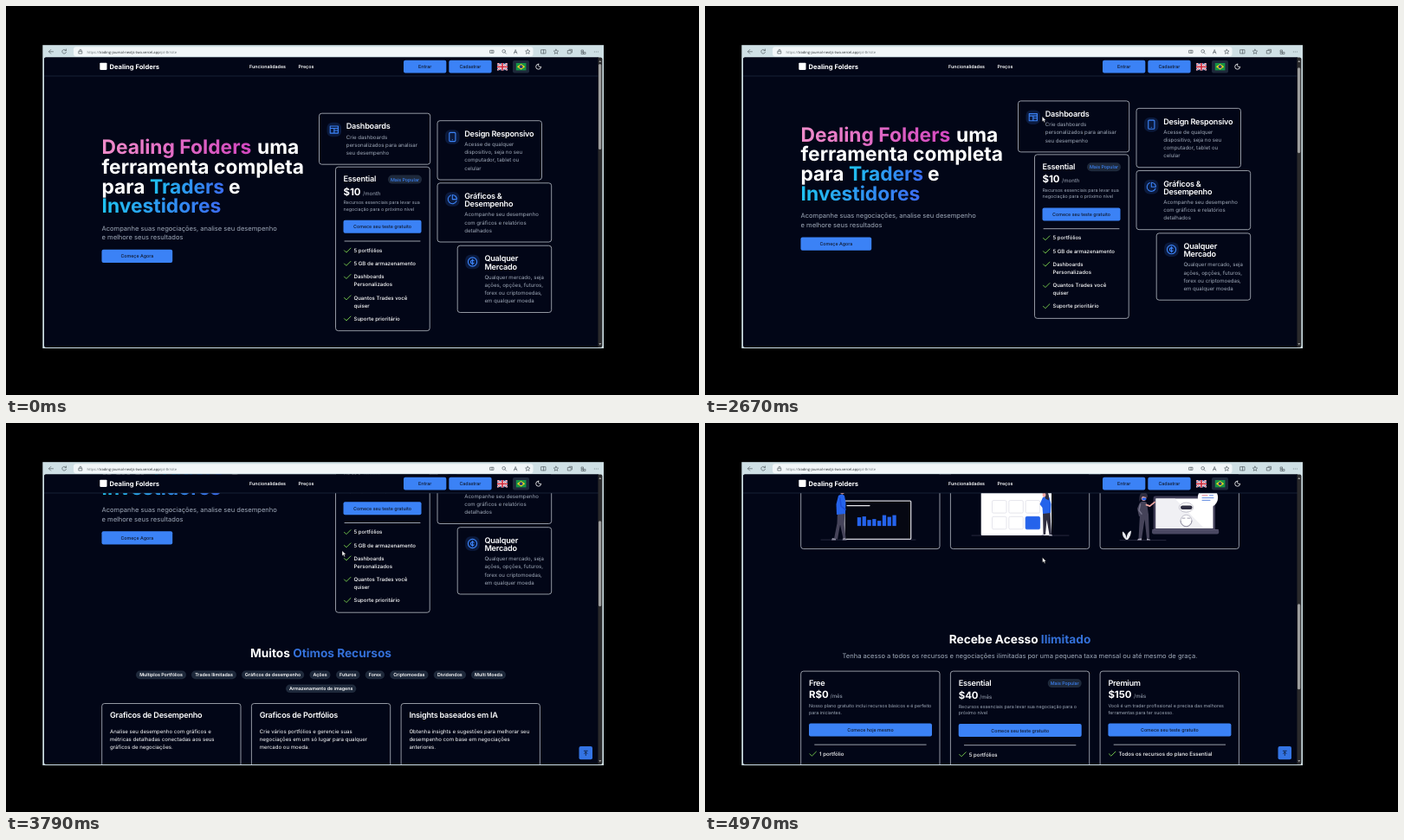
Animation, 800 px wide and 450 px high, one loop 5 s. Source, as an HTML page:

```html
<!DOCTYPE html>
<html lang="pt-BR">
<head>
<meta charset="utf-8">
<title>Dealing Folders</title>
<style>
html, body { margin: 0; width: 100%; height: 100%; overflow: hidden; background: #000; }
svg { display: block; }
text { font-family: Inter, sans-serif; fill: #fff; white-space: pre; text-rendering: geometricPrecision; }
.hero { font-size: 22.8px; font-weight: 700; }
.heading { font-size: 13.68px; font-weight: 700; }
.heading tspan { fill: #3470d8; }
.title { font-size: 9.12px; font-weight: 600; letter-spacing: -.025em; }
.price { font-size: 11.4px; font-weight: 700; }
.brand { font-size: 7.6px; font-weight: 700; }
.lead { font-size: 7.55px; fill: #a0aab9; }
.body { font-size: 6.08px; }
.muted { font-size: 6.08px; fill: #a0aab9; }
.note { font-size: 5.32px; fill: #a0aab9; }
.item { font-size: 6.08px; font-weight: 500; }
.nav { font-size: 5.32px; font-weight: 600; }
.label { font-size: 5.32px; font-weight: 500; fill: #0f172a; }
.badge { font-size: 5.32px; font-weight: 500; fill: #3b82f6; }
.url { font-family: "Open Sans", sans-serif; font-size: 4.1px; fill: #6b7478; }
.url tspan { fill: #22282b; }
.mid { text-anchor: middle; }
.card { fill: #020617; stroke: #c3c8d0; stroke-width: .75; }
.line { fill: none; stroke-linecap: round; stroke-linejoin: round; }
</style>
</head>
<body>
<svg id="stage" width="800" height="450" viewBox="0 0 800 450"></svg>
<script>
const stage = document.getElementById('stage');
const BLUE = '#3b82f6', PAGE = '#020617', HAIR = '#2f2e41', CLOTH = '#454359', SKIN = '#f3a9a4', SLATE = '#1e293b', RULE = '#c3c8d0';

const text = (cls, x, y, str, extra = '') => `<text class="${cls}" x="${x}" y="${y}" ${extra}>${str}</text>`;
const lines = (cls, x, y, step, list) => list.map((s, i) => text(cls, x, y + i * step, s)).join('');
const rect = (x, y, w, h, fill, r = 0, extra = '') =>
  `<rect x="${x}" y="${y}" width="${w}" height="${h}" rx="${r}" fill="${fill}" ${extra}/>`;
const card = (x, y, w, h) => `<rect class="card" x="${x}" y="${y}" width="${w}" height="${h}" rx="3"/>`;
const line = (d, color, width = .8, extra = '') =>
  `<path class="line" d="${d}" stroke="${color}" stroke-width="${width}" ${extra}/>`;
const shape = (d, fill) => `<path d="${d}" fill="${fill}"/>`;
const oval = (x, y, rx, ry, fill, extra = '') => `<ellipse cx="${x}" cy="${y}" rx="${rx}" ry="${ry}" fill="${fill}" ${extra}/>`;
const button = (x, y, w, h, label) =>
  rect(x, y, w, h, BLUE, 2) + text('label mid', x + w / 2, y + h / 2 + 1.9, label);
const popular = (x, y) => rect(x, y, 39, 10, SLATE, 5) + text('badge mid', x + 19.5, y + 6.9, 'Mais Popular');
const check = (x, y) => line(`M${x} ${y}l2.4 2.4 5-5`, '#6fbf4a', 1);

const icons = {
  panels: 'M3 4h18v16H3zM3 9h18M12 9v11M12 14h9',
  phone: 'M7 2h10a2 2 0 0 1 2 2v16a2 2 0 0 1-2 2H7a2 2 0 0 1-2-2V4a2 2 0 0 1 2-2zM12 18h.01',
  pie: 'M21.2 15.9A10 10 0 1 1 8 2.8M22 12A10 10 0 0 0 12 2v10z',
  coin: 'M22 12a10 10 0 1 1-20 0a10 10 0 1 1 20 0M15 9.4a4 4 0 1 0 0 5.2M12 6v12'
};

function feature(x, y, w, h, icon, titles, body) {
  const end = y + 18.6 + (titles.length - 1) * 9.12;
  return card(x, y, w, h) + rect(x + 9, y + 10.5, 16.5, 16.5, '#0b1a3d', 6) +
    line(icons[icon], BLUE, 2.2, `transform="translate(${x + 11.2} ${y + 12.7}) scale(.51)"`) +
    lines('title', x + 31.2, y + 18.2, 9.12, titles) +
    lines('muted', x + 31.2, end + 10.9, 9.12, body);
}

function hero() {
  const items = [[284.8, '5 portfólios'], [300, '5 GB de armazenamento'], [315.1, 'Dashboards', 'Personalizados'],
    [339.5, 'Quantos Trades você', 'quiser'], [363.7, 'Suporte prioritário']];
  return text('hero', 110.5, 171, 'Dealing Folders', 'style="fill:url(#pink)"') + text('hero', 290, 171, 'uma') +
    text('hero', 110.5, 193.8, 'ferramenta completa') + text('hero', 110.5, 216.6, 'para') +
    text('hero', 166, 216.6, 'Traders', 'style="fill:url(#cyan)"') + text('hero', 257, 216.6, 'e') +
    text('hero', 110.5, 239.4, 'Investidores', 'style="fill:url(#cyan)"') +
    lines('lead', 110.5, 259.6, 10.64, ['Acompanhe suas negociações, analise seu desempenho', 'e melhore seus resultados']) +
    button(110.5, 281.8, 81.7, 15.2, 'Começe Agora') +
    feature(361.5, 124.2, 128.2, 59, 'panels', ['Dashboards'], ['Crie dashboards', 'personalizados para analisar', 'seu desempenho']) +
    feature(498, 132.7, 120.5, 68.3, 'phone', ['Design Responsivo'],
      ['Acesse de qualquer', 'dispositivo, seja no seu', 'computador, tablet ou', 'celular']) +
    feature(498, 204.8, 131.7, 68.2, 'pie', ['Gráficos &amp;', 'Desempenho'],
      ['Acompanhe seu desempenho', 'com gráficos e relatórios', 'detalhados']) +
    feature(521.2, 277.2, 108.5, 77.3, 'coin', ['Qualquer', 'Mercado'],
      ['Qualquer mercado, seja', 'ações, opções, futuros,', 'forex ou criptomoedas,', 'em qualquer moeda']) +
    card(380.5, 186.2, 108.7, 189.5) + text('title', 389.5, 203.4, 'Essential') + popular(441, 195.6) +
    text('price', 389.5, 218.6, '$10') + text('muted', 412, 218.6, '/month') +
    lines('note', 389.5, 229, 7.6, ['Recursos essenciais para levar sua', 'negociação para o próximo nível']) +
    button(389.5, 247.8, 90, 15, 'Comece seu teste gratuito') + line('M391 272H478', RULE) +
    items.map(([y, ...list]) => check(390.5, y - 2) + lines('item', 401.5, y, 9.12, list)).join('');
}

function chartArt() {
  const bars = [10, 11, 7, 8, 6, 12.5, 10.5, 12.5];
  return line('M134 306H243', '#3f3d56', .6) + rect(161, 261, 76.7, 44.3, '#060812', 1, 'stroke="#cfcfd6" stroke-width="1.3"') +
    line('M164 266.5H190', '#e6e6ea', 1.2) +
    bars.map((h, i) => rect(175.8 + i * 5.8, 290 - h, 4.3, h, '#2563eb')).join('') +
    shape('M153 274h8.5l-1 14 2 16-3 .5-3.5-16-3 17-4-.5 3.5-18z', CLOTH) +
    shape('M147 304l4 1v1.5h-5zM159.5 304l4 1.3v1.2h-5z', '#8d8ca0') +
    shape('M154 255q4-3 7 0l1.5 8-.5 13-10 1-.5-12z', '#2563eb') +
    line('M156 258l1 9 5 4', '#1d4ed8', 1.6) + oval(158.5, 250, 2.7, 3.3, SKIN) +
    shape('M154.5 250q-1-5 4-5t4.5 4l-5 .5-1 3z', HAIR);
}

function gridArt() {
  let cells = '';
  for (let i = 0; i < 6; i++) {
    const last = i === 5;
    cells += rect(331.5 + i % 3 * 19.3, 260.5 + (i > 2) * 18.7, 16.5, 14.5, last ? '#2563eb' : '#fff', 1.5,
      `stroke="${last ? '#2563eb' : '#dfdfe8'}" stroke-width=".8"`);
  }
  return line('M308 301H420', '#3f3d56', .6) + rect(318.7, 245.3, 81.3, 55.5, '#fff', .8) +
    rect(318.7, 245.3, 81.3, 4.5, '#e6e6ee', .8) + line('M326 251.5H394', '#d4d4de', .5) + cells +
    shape('M390 273h8.5l.5 12 1 15h-2.5l-3-17-1.5 17h-2.5z', HAIR) +
    shape('M390 257q4-3 7.5 0l2 8-.5 10-9 1-.5-7-3-4z', '#2563eb') +
    shape('M388.5 300l3-.5v1.5h-3zM397 300l4 .5v.8h-4z', '#b9b9c8') +
    shape('M389.5 252q2-4.5 5.5-1.5 2.5 3 2 10l-4-2-1-4z', HAIR) + oval(391.5, 254, 2, 2.7, SKIN);
}

function laptopArt() {
  const outline = 'stroke="#8b899c" stroke-width=".5"';
  return line('M479 306.5H532', '#3f3d56', .6) + rect(517.7, 255.3, 71.3, 40, '#3f3d56', 2) +
    rect(520.5, 258.3, 66, 34.5, '#fff') + shape('M520.5 258.3h22l34 34.5h-56z', '#f0f0f4') +
    rect(516, 294, 77.2, 5.5, '#4a4862', 2) + line('M516.5 294.3H592.5', '#6b6982', .5) +
    oval(555.5, 268.5, 8, 5.5, '#fff', outline) + rect(549, 266.3, 13.5, 4.5, HAIR, 2.2) +
    oval(555.5, 284, 6.5, 6.8, '#fff', outline) + line('M549 284a6.5 6.5 0 0 0 13 0M551 281h3M557 281h3', '#77758c', .7) +
    oval(580.5, 257.2, 11.6, 11.6, '#fff') + shape('M571 262l-1.5 8 9-2z', '#fff') +
    line('M574 254.7h6', '#e05d6f') + line('M582.5 254.7h4M574 257.5h13M574 260.3h9', '#3b6fd8') +
    shape('M502 277l10-.5 1 28h-3l-2.5-22-3.5 23h-3.5z', CLOTH) +
    shape('M500 305l4-.5v2h-5zM510 304.5l4 1.2v.8h-4z', '#a9a8b8') +
    shape('M502 263q4-2.5 8 0l2 14-11 2-2-9z', CLOTH) +
    line('M509.5 265.5l4 1.5 5.5-4.5', SKIN, 1.7) + line('M502.5 265l-1.5 7 3 4', '#77758c', 1.5) +
    oval(506.5, 257, 3, 4, SKIN) + shape('M501.5 262q-1-11 5-10.5 5 0 4.5 5.5l-6-1z', HAIR) +
    rect(504.5, 257.5, 4.8, 2.6, '#2563eb', 1) +
    shape('M486 306q-5-4-4-9.5 4 2 4.5 8 .5-7 5.5-9 0 6-4 10.5z', '#e9e9ee');
}

function resources() {
  const pills = [[150, 58, 'Multiplos Portfólios'], [214, 52, 'Trades Ilimitadas'], [272, 72.2, 'Gráficos de desempenho'],
    [350.5, 24, 'Ações'], [381, 27.5, 'Futuros'], [414.7, 22.3, 'Forex'], [443.2, 44.3, 'Criptomoedas'],
    [493.7, 37.3, 'Dividendos'], [537, 40, 'Multi Moeda'], [323, 81.3, 'Armazenamento de imagens']];
  const cards = [
    ['Graficos de Desempenho', 'Analise seu desempenho com gráficos e', 'métricas detalhadas conectadas aos seus', 'gráficos de negociações.'],
    ['Graficos de Portfólios', 'Crie vários portfólios e gerencie suas', 'negociações em um só lugar para qualquer', 'mercado ou moeda.'],
    ['Insights baseados em IA', 'Obtenha insights e sugestões para melhorar seu', 'desempenho com base em negociações', 'anteriores.']];
  return text('heading mid', 363.5, 427.8, 'Muitos <tspan>Otimos Recursos</tspan>') +
    pills.map(([x, w, s], i) => {
      const y = i < 9 ? 443.1 : 459;
      return rect(x, y, w, 9.6, SLATE, 4.8) + text('nav mid', x + w / 2, y + 6.7, s);
    }).join('') +
    cards.map(([title, ...body], i) => {
      const x = 110.7 + i * 172.7;
      return card(x, 481, 160.3, 147) + text('title', x + 9.3, 497.9, title) + lines('body', x + 9.3, 515.1, 9.12, body);
    }).join('') +
    `<g transform="translate(0 311.5)">${chartArt()}${gridArt()}${laptopArt()}</g>`;
}

function pricing() {
  const plans = [
    ['Free', 'R$0', 144.5, 'Comece hoje mesmo', '1 portfólio', 'Nosso plano gratuito inclui recursos básicos e é perfeito', 'para iniciantes.'],
    ['Essential', '$40', 317, 'Comece seu teste gratuito', '5 portfólios', 'Recursos essenciais para levar sua negociação para o', 'próximo nível'],
    ['Premium', '$150', 495, 'Comece seu teste gratuito', 'Todos os recursos do plano Essential', 'Você é um trader profissional e precisa das melhores', 'ferramentas para ter sucesso.']];
  return text('heading mid', 363.5, 737.6, 'Recebe Acesso <tspan>Ilimitado</tspan>') +
    text('lead mid', 363.5, 754.2, 'Tenha acesso a todos os recursos e negociações ilimitadas por uma pequena taxa mensal ou até mesmo de graça.') +
    plans.map(([name, price, perX, action, item, ...note], i) => {
      const x = 110.7 + i * 172.7, left = x + 9.3, y = 769.5 + (i === 1) * .6;
      return card(x, 769.5, 160.3, 160) + text('title', left, y + 16.7, name) + (i === 1 ? popular(395.7, 778.5) : '') +
        text('price', left, y + 31.2, price) + text('muted', perX, y + 31.2, '/mês') +
        lines('note', left, y + 42, 7.6, note) + button(left, y + 60.4, 142, 15, action) +
        line(`M${x + 16} ${y + 85}H${x + 144.5}`, RULE) + check(left + 1, y + 95.7) + text('item', left + 12, y + 97.8, item);
    }).join('');
}

function header() {
  const uk = '<svg x="567" y="66" width="12" height="8.6" viewBox="0 0 24 17"><path fill="#22367e" d="M0 0h24v17H0z"/>' +
    line('M0 0L24 17M24 0L0 17', '#fff', 4) + line('M0 0L24 17M24 0L0 17', '#cf2a3c', 1.5) +
    line('M12 0V17M0 8.5H24', '#fff', 6) + line('M12 0V17M0 8.5H24', '#cf2a3c', 3.4) + '</svg>';
  return rect(44, 59, 640, 22, PAGE) + rect(44, 80.7, 640, .6, '#27334a') +
    rect(108.3, 65.7, 8.2, 8.2, '#fff', .8) + text('brand', 119.5, 72.6, 'Dealing Folders') +
    text('nav', 281, 72, 'Funcionalidades') + text('nav', 337.5, 72, 'Preços') +
    button(459, 62.7, 49.3, 14.8, 'Entrar') + button(511.3, 62.7, 49.3, 14.8, 'Cadastrar') + uk +
    rect(585, 63, 19, 14.5, SLATE, 2) + rect(588.8, 66, 11.6, 8.4, '#159347') +
    shape('M594.6 67l4.6 3.2-4.6 3.2-4.6-3.2z', '#fbd51f') + oval(594.6, 70.2, 1.9, 1.9, '#24377c') +
    line('M614.7 67.2a2.2 2.2 0 0 0 3 3 3 3 0 1 1-3-3z', '#fff');
}

function toolbar() {
  const star = 'l.8 1.7 1.9.2-1.4 1.3.4 1.9-1.7-1-1.7 1 .4-1.9-1.4-1.3 1.9-.2z';
  const glyphs = 'M54.5 52.8H49.5m2.2-2.3l-2.3 2.3 2.3 2.3M69.3 51.5a2.4 2.4 0 1 0 .2 2M69.5 50v1.7h-1.7' +
    'M84.2 52.3h3.6v2.7h-3.6zM85 52v-.8a1 1 0 0 1 2 0v.8M559 51.3h4v3h-4zM561 51.3v3' +
    'M576.5 52.3a1.8 1.8 0 1 1-3.6 0a1.8 1.8 0 1 1 3.6 0M576 53.7l1.5 1.5M586.5 55l1.7-4.5 1.7 4.5M587 53.5h2.3' +
    `M602.3 50.2${star}M618 50.7h5v4.2h-5zM620.5 50.7v4.2M635 50.2${star}` +
    'M648.7 51.5h3.5v3.5h-3.5zM650 50.3h3.5v3.5M664.5 51h2v2h-2zM664.5 53.5h2v2h-2zM667 53.5h2v2h-2z' +
    'M679.3 53h.1M681.3 53h.1M683.3 53h.1';
  return rect(42.3, 45.2, 647.7, 350.8, '#cfe0e5') + rect(78, 47.2, 530.5, 11, '#f1f6f8', 3) + line(glyphs, '#566166', .7) +
    text('url', 93.5, 54.5, 'https://<tspan>trading-journal-nextjs-two.vercel.app</tspan>/pt-Br/site');
}

const gradient = (id, from, to) =>
  `<linearGradient id="${id}"><stop stop-color="${from}"/><stop offset="1" stop-color="${to}"/></linearGradient>`;

stage.innerHTML = `<defs>${gradient('pink', '#f08cca', '#d247bf')}${gradient('cyan', '#1fc3f0', '#3b6cf2')}
  <clipPath id="view"><rect x="44" y="59.4" width="644.4" height="335.6" rx="2"/></clipPath></defs>
  ${toolbar()}
  <g clip-path="url(#view)">
    ${rect(44, 59, 640, 336, PAGE)}
    <g id="page">${hero()}${resources()}${pricing()}</g>
    ${header()}
    <g id="toTop">${rect(661.5, 374, 15.5, 15.2, '#3474e4', 2)}${line('M667.3 379.3h4M669.3 384.5v-3.7m-1.7 1.5l1.7-1.7 1.7 1.7', '#0f172a')}</g>
    ${rect(683.5, 59, 6, 336, '#2a2a2c')}
    ${shape('M684.3 65l1.5-2.2 1.5 2.2zM684.3 390l1.5 2.2 1.5-2.2z', '#9a9a9a')}
    <g id="thumb">${rect(684, 67, 3.2, 99, '#9c9c9c', 1.6)}</g>
  </g>
  <g id="cursor">
    <path id="arrow" d="M0 0v6l1.4-1.2 1 2.2 1.1-.5-1-2.1h1.9z" fill="#fff" stroke="#000" stroke-width=".4"/>
    <path id="beam" class="line" d="M-1 -2h2M0 -2v7M-1 5h2" stroke="#fff" stroke-width=".8"/>
  </g>`;

const [page, toTop, thumb, cursor, arrow, beam] =
  ['page', 'toTop', 'thumb', 'cursor', 'arrow', 'beam'].map(id => document.getElementById(id));

const scrollKeys = [[2450, 0], [2970, 57.5], [3240, 118.3], [3480, 135], [3640, 135], [4030, 221], [4520, 311.5], [4970, 482], [5000, 493]];
const cursorX = [[1640, 77], [2150, 389.5], [2180, 390], [2450, 390], [2970, 388], [4520, 388], [4970, 389.5]];
const cursorY = [[1640, 339.5], [2150, 125.5], [2180, 124], [2450, 124], [2970, 138], [3240, 146.5], [4030, 148], [4520, 148.5], [4970, 155.5]];

// Monotone cubic through [time, value] keys
function track(keys, t) {
  const n = keys.length;
  if (t <= keys[0][0]) return keys[0][1];
  if (t >= keys[n - 1][0]) return keys[n - 1][1];
  const secant = i => (keys[i + 1][1] - keys[i][1]) / (keys[i + 1][0] - keys[i][0]);
  const slope = i => {
    if (i === 0 || i === n - 1) return 0;
    const a = secant(i - 1), b = secant(i);
    return a * b > 0 ? 2 * a * b / (a + b) : 0;
  };
  const i = keys.findIndex(k => k[0] > t) - 1;
  const [t0, v0] = keys[i], [t1, v1] = keys[i + 1];
  const d = t1 - t0, u = (t - t0) / d, w = 1 - u;
  return w * w * (1 + 2 * u) * v0 + u * u * (3 - 2 * u) * v1 + d * u * w * (w * slope(i) - u * slope(i + 1));
}

const show = (el, on) => el.setAttribute('visibility', on ? 'visible' : 'hidden');
const move = (el, x, y) => el.setAttribute('transform', `translate(${x} ${y})`);

function draw(now) {
  const t = now % 5000, scroll = track(scrollKeys, t), x = track(cursorX, t), y = track(cursorY, t);
  const overText = Math.abs(y + scroll - 462) < 5;
  move(page, 0, -scroll);
  move(thumb, 0, scroll * .295);
  move(cursor, x, y);
  show(toTop, scroll > 140);
  show(arrow, t >= 1640 && !overText);
  show(beam, t >= 1640 && overText);
  requestAnimationFrame(draw);
}
draw(performance.now());
</script>
</body>
</html>
```
